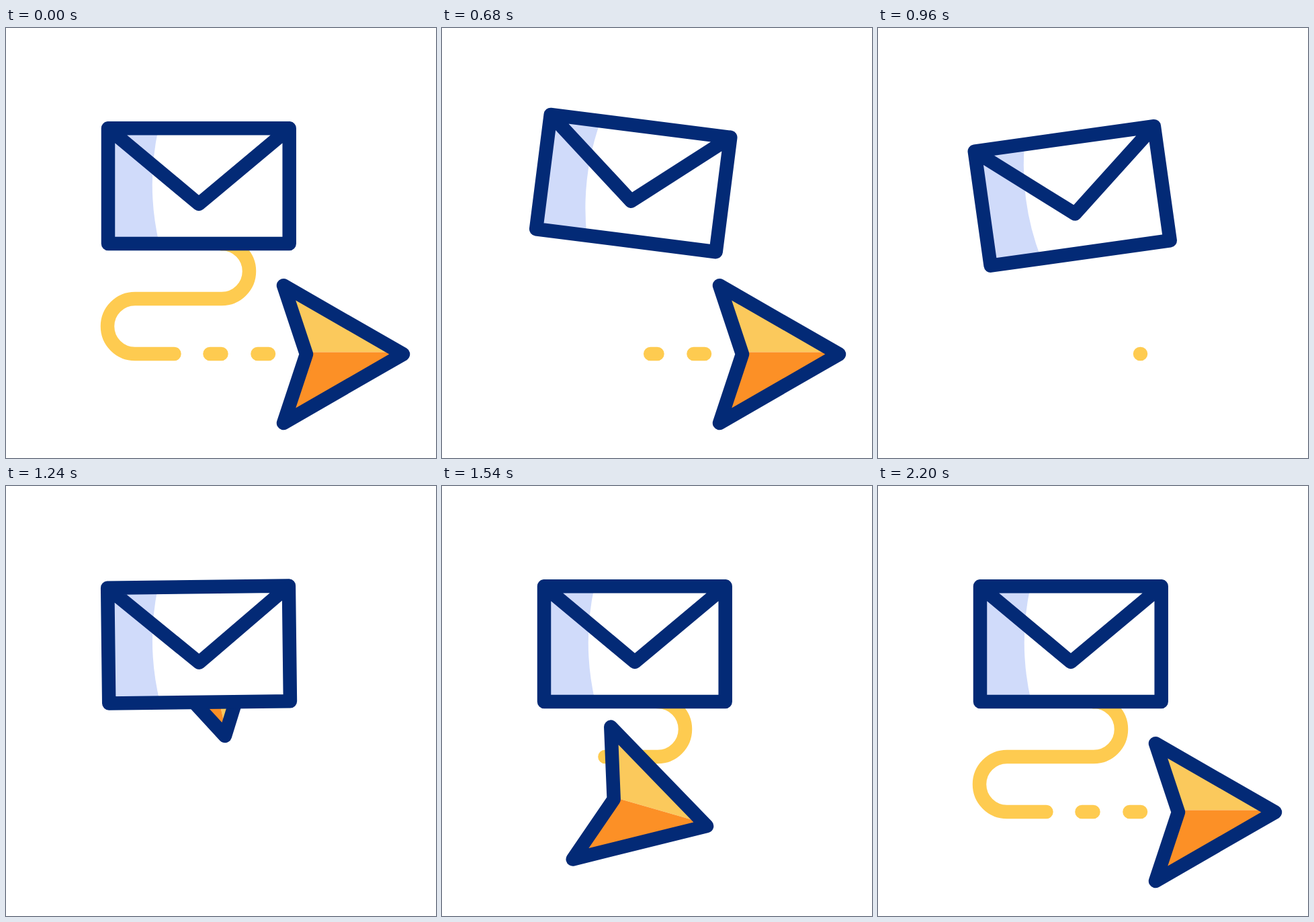
Animation, 640 px wide and 640 px high, one loop 2400 ms. Source, as an HTML page:

```html
<!DOCTYPE html>
<html lang="en">
<head>
<meta charset="utf-8">
<title>Message sent</title>
<style>
  html, body { margin: 0; width: 100%; height: 100%; overflow: hidden; background: #fff; }
  svg { display: block; width: 100vw; height: 100vh; }
  .trail { fill: none; stroke: #fecb50; stroke-width: 20.5; stroke-linecap: round; }
  .line { fill: none; stroke: #032a76; stroke-width: 20.5; stroke-linecap: round; stroke-linejoin: round; }
</style>
</head>
<body>
<svg viewBox="0 0 640 640">
  <g id="trail"></g>
  <g id="arrow">
    <path fill="#fbc95c" d="M-89 -102.3 L89 0 L86 -3 H-55 Z"/>
    <path fill="#fc9026" d="M-89 102.5 L89 0 L86 -3 H-55 Z"/>
    <path class="line" d="M-89 -102.3 L89 0 L-89 102.5 L-55 0 Z"/>
  </g>
  <g id="envelope">
    <path fill="#fff" d="M152 149.3 H421.7 V321 H152 Z"/>
    <path fill="#d0dbfa" d="M152 149.3 H227 Q208 235 228 321 H152 Z"/>
    <path class="line" d="M152 149.3 H421.7 V321 H152 Z L287 262 L421.7 149.3"/>
  </g>
</svg>
<script>
  const LOOP = 2400;
  const ARC = Math.PI * 41;
  const TURN = 2 * ARC + 129;            // arc length where the last straight begins
  const TRAIL_END = TURN + 199;
  const TRAIL_PATH = 'M321 321 A41 41 0 0 1 321 403 H192 A41 41 0 0 0 192 485 H391';
  const PIECES = [[0, TURN + 58], [TURN + 111, TURN + 128], [TURN + 182, TRAIL_END]];

  const arrow = document.getElementById('arrow');
  const envelope = document.getElementById('envelope');
  const trail = document.getElementById('trail');
  const dashes = PIECES.map(() => {
    const path = document.createElementNS('http://www.w3.org/2000/svg', 'path');
    path.setAttribute('class', 'trail');
    path.setAttribute('d', TRAIL_PATH);
    return trail.appendChild(path);
  });

  const progress = (t, from, to) => Math.min(1, Math.max(0, (t - from) / (to - from)));
  const smooth = (t, from, to) => {
    const u = progress(t, from, to);
    return u * u * (3 - 2 * u);
  };
  const mix = (a, b, u) => a + (b - a) * u;

  // Eased interpolation through [time, value] keys
  function track(t, keys) {
    let value = keys[0][1];
    for (let i = 1; i < keys.length; i++) {
      value += (keys[i][1] - keys[i - 1][1]) * smooth(t, keys[i - 1][0], keys[i][0]);
    }
    return value;
  }

  function drawTrail(t) {
    const erasing = t < 1100;
    const start = erasing ? TRAIL_END * (1 - Math.pow(1 - progress(t, 220, 1020), 2.3)) : 0;
    const end = erasing ? TRAIL_END : TRAIL_END * smooth(t, 1194, 2059);
    PIECES.forEach(([a, b], i) => {
      const from = Math.max(a, start);
      const length = Math.min(b, end) - from;
      dashes[i].style.display = length > 0 ? '' : 'none';
      if (length > 0) dashes[i].setAttribute('stroke-dasharray', `0 ${from} ${length} 9999`);
    });
  }

  function drawArrow(t) {
    let x, y, angle = 0;
    if (t < 1100) {
      const flight = Math.max(0, t - 680);
      x = 502 + 0.0036 * flight * flight;
      y = 485.5;
    } else {
      const glide = smooth(t, 1520, 2190);
      x = mix(306, 308, smooth(t, 1127, 1520)) + 194 * glide;
      y = mix(235, 481.5, smooth(t, 1127, 1520)) + 4 * glide;
      angle = mix(90, 0, smooth(t, 1098, 1704));
    }
    arrow.setAttribute('transform', `translate(${x} ${y}) rotate(${angle})`);
  }

  function drawEnvelope(t) {
    const angle = track(t, [[220, 0], [640, 8], [950, -8], [1305, 0]]);
    const rise = track(t, [[220, 0], [430, -21], [950, 15], [1290, 0]]);
    envelope.setAttribute('transform', `translate(0 ${rise}) rotate(${angle} 287 218)`);
  }

  function render(t) {
    drawTrail(t);
    drawArrow(t);
    drawEnvelope(t);
  }

  const began = performance.now();
  function tick() {
    render((performance.now() - began) % LOOP);
    requestAnimationFrame(tick);
  }
  tick();
</script>
</body>
</html>
```
